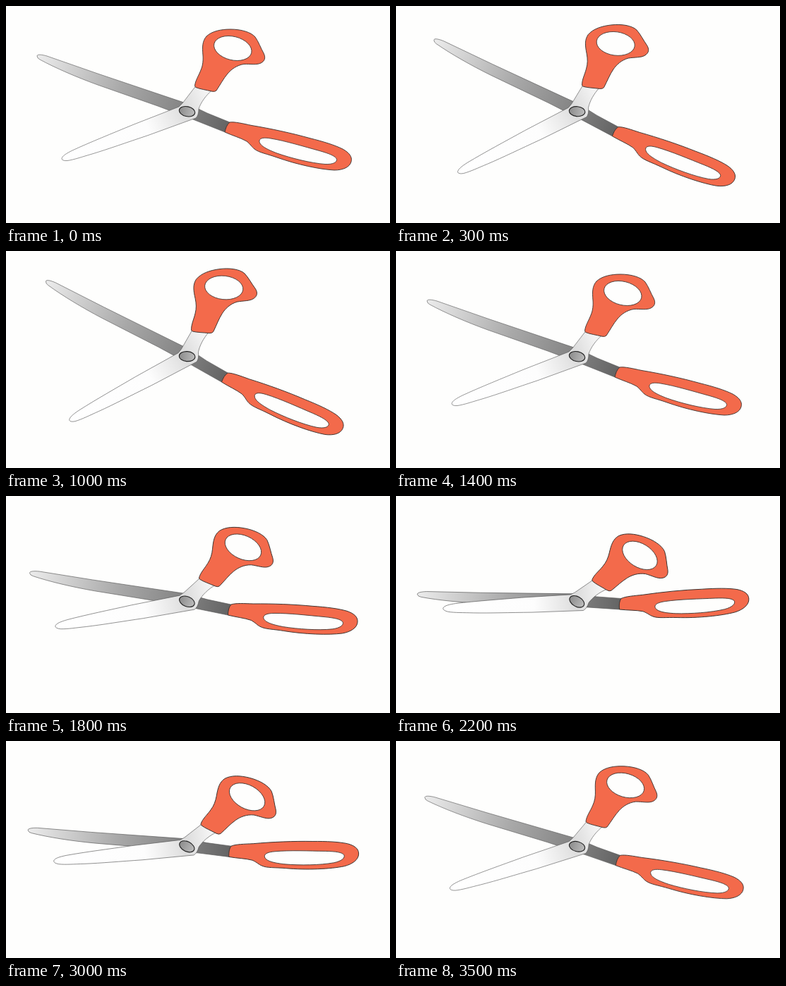
These frames come from a looping animation (544x308 px, 3600 ms). An HTML page:

```html
<!DOCTYPE html>
<html lang="en">
<head>
<meta charset="utf-8">
<title>Scissors</title>
<style>
  html, body { margin: 0; width: 100%; height: 100%; overflow: hidden; background: #fefefd; }
  svg { display: block; width: 100vw; height: 100vh; }
  .steel { stroke: #555; stroke-width: .6; stroke-linejoin: round; }
  .grip { fill: #f36a4b; stroke: #3a3330; stroke-width: .9; stroke-linejoin: round; }
  .hole { fill: #fefefd; stroke: #3a3330; stroke-width: .8; }
  .screw { stroke: #222; stroke-width: 1.1; }
</style>
</head>
<body>
<svg viewBox="0 0 544 308">
  <defs>
    <linearGradient id="dark" gradientUnits="userSpaceOnUse" x1="44" y1="70" x2="313" y2="172">
      <stop offset="0" stop-color="#ececec"/>
      <stop offset=".45" stop-color="#a8a8a8"/>
      <stop offset=".78" stop-color="#828282"/>
      <stop offset="1" stop-color="#646464"/>
    </linearGradient>
    <linearGradient id="light" gradientUnits="userSpaceOnUse" x1="79" y1="217" x2="285" y2="132">
      <stop offset="0" stop-color="#fff"/>
      <stop offset=".58" stop-color="#fdfdfd"/>
      <stop offset=".85" stop-color="#dcdcdc"/>
      <stop offset="1" stop-color="#f3f3f3"/>
    </linearGradient>
    <linearGradient id="metal">
      <stop offset="0" stop-color="#8c8c8c"/>
      <stop offset="1" stop-color="#bcbcbc"/>
    </linearGradient>
  </defs>

  <g id="lower">
    <path class="steel" fill="url(#dark)" d="M44 71C44 68 51 69 58 71L130 96L258 139L285 152L317 165L310 179L265 161L215 142L130 112C100 101 70 88 48 76Q44 74 44 71Z"/>
    <path class="grip" d="M317 165C324 164 336 167 348 169.500C375 174 405 180.500 430 187.500C450 192.500 466 197.500 477 203C486 208 491 214 489 221C487 229 477 233 465 233C445 232 412 225 384 215C370 210 358 208 352 203C348 200 347 197 341 192C332 187 321 184 310 179C311 174 313 168 317 165Z"/>
    <path class="hole" d="M359 191C360 187 366 186.500 375 188C396 191.500 422 199.500 444 205.500C458 209.500 467 213 468.500 217.500C469 222 463 225 452 224.500C432 223 404 216 384 209C371 204 358 198 359 191Z"/>
  </g>

  <g id="upper">
    <path class="steel" fill="url(#light)" d="M79 217C79 213 86 209 94 205C120 193 150 181 180 168.500L245 143L250 138L270 112L292 119.500C283 127 276 137 273 146Q273 155 269 159L200 184C170 194 145 203 122 210C108 214 97 218 87 219.500Q80 220 79 217Z"/>
    <path class="grip" d="M267.500 113.500C268 106 273 99 276 91C279 84 279.500 77 279 70C278 58 278 50 284 43C292 35.500 305 33 318 33C333 33 347 37 353 44C358 51 361 60 365 67C368 73 367 78 361 81C355 84 346 82 337 82.500C327 84 319 90 314 96C308 103 304 111 298 120Q296 122 292 121.200C283 119 275 118 269 115.500Q267.500 114.500 267.500 113.500Z"/>
    <ellipse class="hole" cx="321.300" cy="60" rx="27.200" ry="16.700" transform="rotate(14 321.300 60)"/>
    <ellipse class="screw" fill="url(#metal)" cx="256.500" cy="149.700" rx="11.300" ry="7" transform="rotate(12 256.500 149.700)"/>
  </g>
</svg>
<script>
  const LOOP = 3600, STEP = 100, WIDEST = 700, SWING = 14.8;
  const lower = document.getElementById('lower');
  const upper = document.getElementById('upper');
  const opening = t => SWING * Math.cos(2 * Math.PI * (t - WIDEST) / LOOP);
  const turn = (part, angle) => part.setAttribute('transform', `rotate(${angle.toFixed(3)} 256 149)`);

  function draw(time) {
    const t = Math.floor((time % LOOP) / STEP) * STEP;
    const angle = opening(t) - opening(0);
    turn(lower, angle);
    turn(upper, -angle);
  }

  const start = performance.now();
  function tick() {
    draw(performance.now() - start);
    requestAnimationFrame(tick);
  }
  tick();
</script>
</body>
</html>
```
